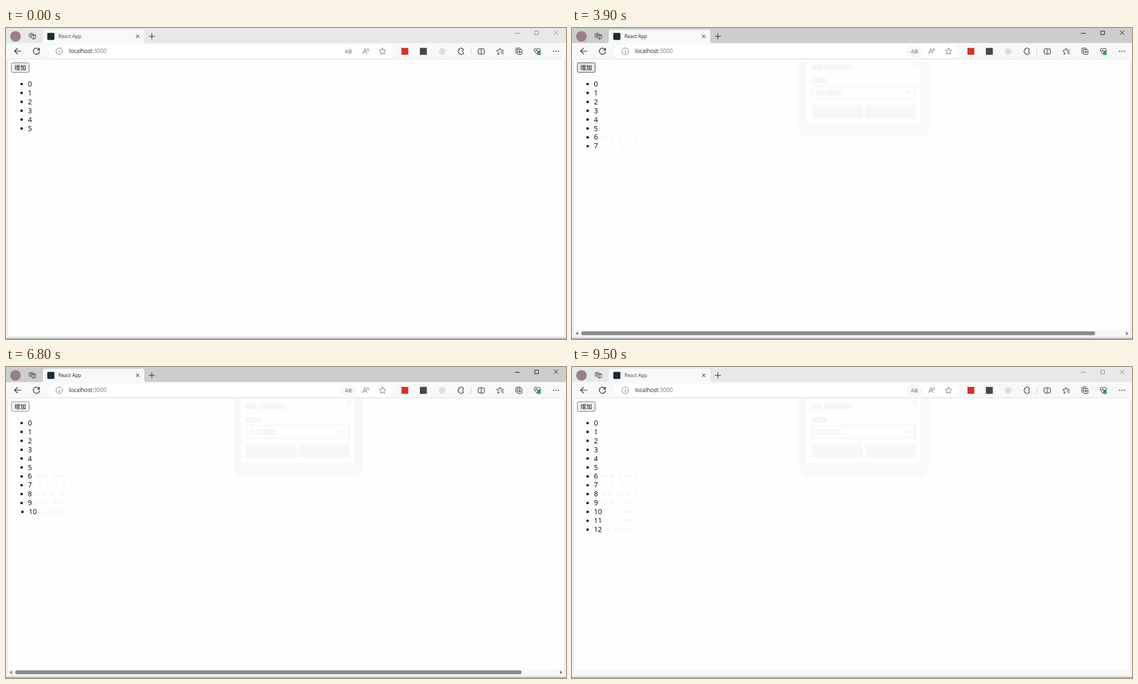
Recreate the animation shown at these times as an HTML page. Size 1004 by 558 pixels, loop 9.6 s.

```html
<!DOCTYPE html>
<html lang="zh">
<head>
<meta charset="utf-8">
<title>React App</title>
<style>
  html, body { margin: 0; width: 100%; height: 100%; overflow: hidden; background: #f5f5f7; }
  svg { display: block; width: 1004px; height: 558px; font-family: "Open Sans", "Noto Sans", sans-serif; }
  .cjk { font-family: "Noto Sans CJK SC", "Noto Sans CJK", sans-serif; }
  .ico { fill: none; stroke: #222; stroke-width: 1; stroke-linecap: round; stroke-linejoin: round; }
  .soft { stroke: #777; }
  .num { font-size: 12.6px; }
  #popup .card { filter: drop-shadow(0 3px 6px rgba(0, 0, 0, .25)); }
</style>
</head>
<body>
<svg id="stage" viewBox="0 0 1004 558">
  <rect width="1004" height="558" fill="#f5f5f7"/>
  <rect id="bar" width="1004" height="27.500"/>
  <path d="M62 27.500q4 0 4-4V7q0-4 4-4H244q4 0 4 4V23.500q0 4 4 4Z" fill="#f8f8f8"/>
  <rect y="27" width="1004" height="29" fill="#f8f8f8"/>
  <rect x="76" y="30" width="618" height="23.500" rx="11.700" fill="#fff"/>
  <rect y="556" width="1004" height="2" fill="#b4b4b6"/>
  <rect x="2.500" y="55.500" width="999" height="498.500" rx="6" fill="#fefefe" stroke="#dfdfe2"/>

  <!-- tab strip -->
  <circle cx="17" cy="15" r="9.500" fill="#98808a"/>
  <g class="ico">
    <path d="M46.500 12.500l3.500-.8 3 1.300v5.500l-3.500 1.500-3-1.300ZM46.500 12.500l3 1.200 3.500-.7M49.500 13.700V20M44 17.700V11.500l4.500-1.500M41.500 16.700V10.700L46 9" stroke-width=".8"/>
    <path d="M233.300 12.300l5.600 5.600M238.900 12.300l-5.600 5.600M256.500 15h10M261.500 10v10"/>
  </g>
  <rect id="fav" x="74" y="8.800" width="12.800" height="12.600" rx="2" fill="#1d2b33"/>
  <text id="title" x="94" y="18.300" font-size="8.750">React App</text>
  <path id="win" class="ico" d="M913 9.500h7.500M948.500 5.500h6v6.500h-6ZM982.800 5l7 7M989.800 5l-7 7"/>

  <!-- toolbar -->
  <rect id="reload" x="40" y="30.500" width="30" height="22.500" rx="4" fill="#e5e5e5"/>
  <rect id="lang" x="599" y="32" width="30" height="20" rx="10"/>
  <g class="ico">
    <path d="M27 41.500H15.500M20.500 36.500l-5 5 5 5" stroke-width="1.200"/>
    <path d="M59.700 39.300A5.600 5.600 0 1 0 60.200 42M60 36v3.600h-3.600" stroke-width="1.200"/>
    <path d="M850.500 37.500H847.500q-1 0-1 1V45.500q0 1 1 1H850.500M853.500 37.500h3q1 0 1 1V45.500q0 1-1 1h-3M852 36v12"/>
    <path d="M885 46l-3 1.300.6-4-2.800-2.900 3.900-.6 1.800-3.600 1.700 3.500M888 40h4M887 43h5M889 46h3"/>
    <path d="M917 38.500h6.500q1.500 0 1.500 1.500v6q0 1.500-1.500 1.500h-5q-1.500 0-1.500-1.500ZM921 40.700v4.600M918.700 43h4.600M915.500 45.500q-1.500-.5-1.500-2v-5.500q0-2 2-2h5q1.500 0 2 1"/>
    <path d="M947.500 41.500h2.500l1.500-2.500 2 4.500 1.300-2h3.200M947.300 41q-1-4.500 2.500-4.500 1.700 0 2.700 1.600 1-1.600 2.700-1.600 3.500 0 2.500 4.500M948.500 43.500l4 3.700"/>
    <path d="M812 37.500h2q0-2 1.700-2t1.700 2h2.600v3q-1.700 0-1.700 1.500t1.700 1.500v3h-2.700q0 1.500-1.500 1.500t-1.500-1.500h-2.300v-2.700q-2 0-2-1.800t2-1.800Z"/>
  </g>
  <path d="M833.500 36v12" stroke="#ccc"/>
  <circle cx="955.500" cy="45.300" r="3.300" fill="#1c8a2c"/>
  <path d="M954 45.300l1.200 1.200 2-2.300" fill="none" stroke="#fff" stroke-width=".9"/>
  <g fill="#222"><circle cx="981.700" cy="41.700" r="1"/><circle cx="986" cy="41.700" r="1"/><circle cx="990.300" cy="41.700" r="1"/></g>
  <g class="ico soft">
    <circle cx="95.500" cy="41.700" r="5.900"/><path d="M95.500 41v3.500M95.500 38.700v.1"/>
    <path d="M639.500 46.300l3.800-9.500 3.800 9.500M641 43h4.700M646.500 37.500q1.500 1.200 1 3.200M648.700 36.300q2.200 2 1.300 5"/>
    <path d="M675 35.800l1.800 3.700 4 .6-2.900 2.900.7 4.100-3.600-1.900-3.600 1.900.7-4.100-2.900-2.900 4-.6Z"/>
  </g>
  <g fill="#666"><text x="607.500" y="45.300" font-size="10.500">a</text><text class="cjk" x="612.800" y="44.500" font-size="8.500">あ</text></g>
  <rect x="709" y="35.700" width="12.300" height="12.300" fill="#cf3529"/>
  <rect x="742" y="35.700" width="12.500" height="12.500" fill="#474747"/>
  <circle cx="782" cy="42" r="6" fill="#dedede"/>
  <text x="113" y="45.400" font-size="10" fill="#222">localhost<tspan fill="#777">:3000</tspan></text>

  <!-- page -->
  <g id="ghost"></g>
  <rect id="strip" x="3" y="542.500" width="998" height="10.500" rx="3" fill="#f8f8f8"/>
  <g id="scroll" fill="#8a8a8a">
    <path d="M6 548l5-3.500v7ZM998 548l-5-3.500v7Z"/>
    <rect id="thumb" x="16.500" y="544.300" height="7" rx="3.500"/>
  </g>
  <rect id="btn" x="9.500" y="62.500" width="32" height="17" rx="2"/>
  <text class="cjk" x="15" y="75" font-size="10.400">增加</text>
  <g id="list"></g>
  <g id="popup"></g>
</svg>
<script>
const LOOP = 9600, STEP = 100, SLIDE = 980, SHIFT = 75;
const STARTS = [2152, 2960, 4330, 5150, 6000, 6900, 7920];
const $ = id => document.getElementById(id);
const set = (id, attrs) => { for (const k in attrs) $(id).setAttribute(k, attrs[k]); };
const show = (id, on) => set(id, { visibility: on ? 'visible' : 'hidden' });
const within = (t, a, b) => t >= a && t < b;
const clamp = v => Math.max(0, Math.min(1, v));

// CSS "ease": cubic-bezier(.25, .1, .25, 1)
function ease(x) {
  if (x <= 0 || x >= 1) return clamp(x);
  const bez = (a, b, u) => 3 * a * u * (1 - u) ** 2 + 3 * b * u * u * (1 - u) + u ** 3;
  let lo = 0, hi = 1;
  for (let i = 0; i < 24; i++) {
    const mid = (lo + hi) / 2;
    if (bez(.25, .25, mid) < x) lo = mid; else hi = mid;
  }
  return bez(.1, 1, lo);
}

function popup(c) {
  const text = (x, y, s, fill = c.ink, anchor = 'start', size = 9.3) =>
    `<text class="cjk" x="${x}" y="${y}" font-size="${size}" fill="${fill}" text-anchor="${anchor}"
      stroke="${c.blur ? fill : 'none'}" stroke-width="2">${s}</text>`;
  return `<path class="card" d="M421 ${c.top}H625V167.500q0 5-5 5H426q-5 0-5-5Z" fill="#fefefe"/>
    ${text(430, 73.700, '翻译 日语 的页面?')}
    <path d="M611.500 60.500l7 7M618.500 60.500l-7 7" stroke="${c.ink}" stroke-width="${c.blur ? 3 : 1}"/>
    ${text(430, 97.700, '翻译为')}
    <rect x="431" y="105" width="184" height="23" rx="2" fill="#fefefe" stroke="${c.line}" stroke-width="${c.blur ? 2.500 : 1}"/>
    ${text(437, 119.700, '中文 (简体)')}
    <path d="M600 114.500l4 4 4-4" fill="none" stroke="${c.ink}" stroke-width="${c.blur ? 3 : 1}"/>
    <rect x="430" y="138" width="91" height="24.500" rx="2" fill="${c.main}"/>
    <rect x="525.500" y="138" width="91" height="24.500" rx="2" fill="${c.side}"/>
    ${c.blur ? '' : text(475.500, 153.700, '翻译', '#fff', 'middle') + text(571, 153.700, '以后再说', c.ink, 'middle')}`;
}

const FAINT = '#f6f6f6';
$('popup').innerHTML = popup({ top: 54, ink: '#222', line: '#8a8a8a', main: '#0f6cbd', side: '#f0f0f0' });
$('ghost').innerHTML = '<path d="M407 56H640V177q0 18-18 18H425q-18 0-18-18Z" fill="#f8f8f8"/>' +
  popup({ top: 56, ink: FAINT, line: FAINT, main: '#f7f7f7', side: '#f7f7f7', blur: true });

function row(n, dx, fill, alpha = 1) {
  const y = 100.300 + 15.930 * n;
  return `<g fill="${fill}" opacity="${alpha}"><circle cx="${28 + dx}" cy="${y + .3}" r="2.200"/>
    <text class="num" x="${39.300 + dx}" y="${y + 4.600}">${n}</text></g>`;
}

const progress = (t, start) => ease((t - start) / SLIDE);

function added(t, start, n) {
  if (t < start) return '';
  let out = '';
  // faint marks left where the sliding row was painted
  const first = Math.ceil(start / STEP) * STEP;
  for (let k = 0; k < 5; k++) {
    const s = first + k * STEP;
    if (s < t) out += row(n, SHIFT * (1 - progress(s, start)), FAINT);
  }
  const p = progress(t, start);
  return out + row(n, SHIFT * (1 - p), '#000', p);
}

function draw(t) {
  const active = within(t, 1100, 9500);
  set('bar', { fill: active ? '#cdcdcd' : '#e8e8e8' });
  set('title', { fill: active ? '#222' : '#444' });
  $('win').style.stroke = active ? '#111' : '#888';
  show('fav', !within(t, 1200, 1300));
  show('reload', within(t, 800, 1500));
  show('lang', t >= 1400);
  set('lang', { fill: t < 2100 ? '#ebebeb' : '#f8f8f8' });

  const alpha = t < 1800 ? clamp((t - 1350) / 120) : clamp(1 - (t - 2080) / 150);
  set('popup', { opacity: alpha });
  show('ghost', t >= 2200);

  const pressed = STARTS.some(s => within(t, s - 135, s));
  const hover = within(t, 2100, 8800);
  set('btn', {
    fill: pressed ? '#f2f2f2' : hover ? '#e5e5e5' : '#efefef',
    stroke: pressed ? '#8d8d8d' : hover ? '#4f4f4f' : '#767676'
  });

  const last = STARTS.filter(s => s <= t).length - 1;
  show('strip', last >= 0);
  show('scroll', STARTS.some(s => within(t, s, s + SLIDE)));
  set('thumb', { width: last === 1 ? 921.500 : 908 });

  let rows = '';
  for (let n = 0; n < 6; n++) rows += row(n, 0, '#000');
  STARTS.forEach((s, i) => rows += added(t, s, 6 + i));
  $('list').innerHTML = rows;
}

let shown = -1;
function tick() {
  const t = Math.floor(performance.now() % LOOP / STEP) * STEP;
  if (t !== shown) draw(shown = t);
  requestAnimationFrame(tick);
}
tick();
</script>
</body>
</html>
```
